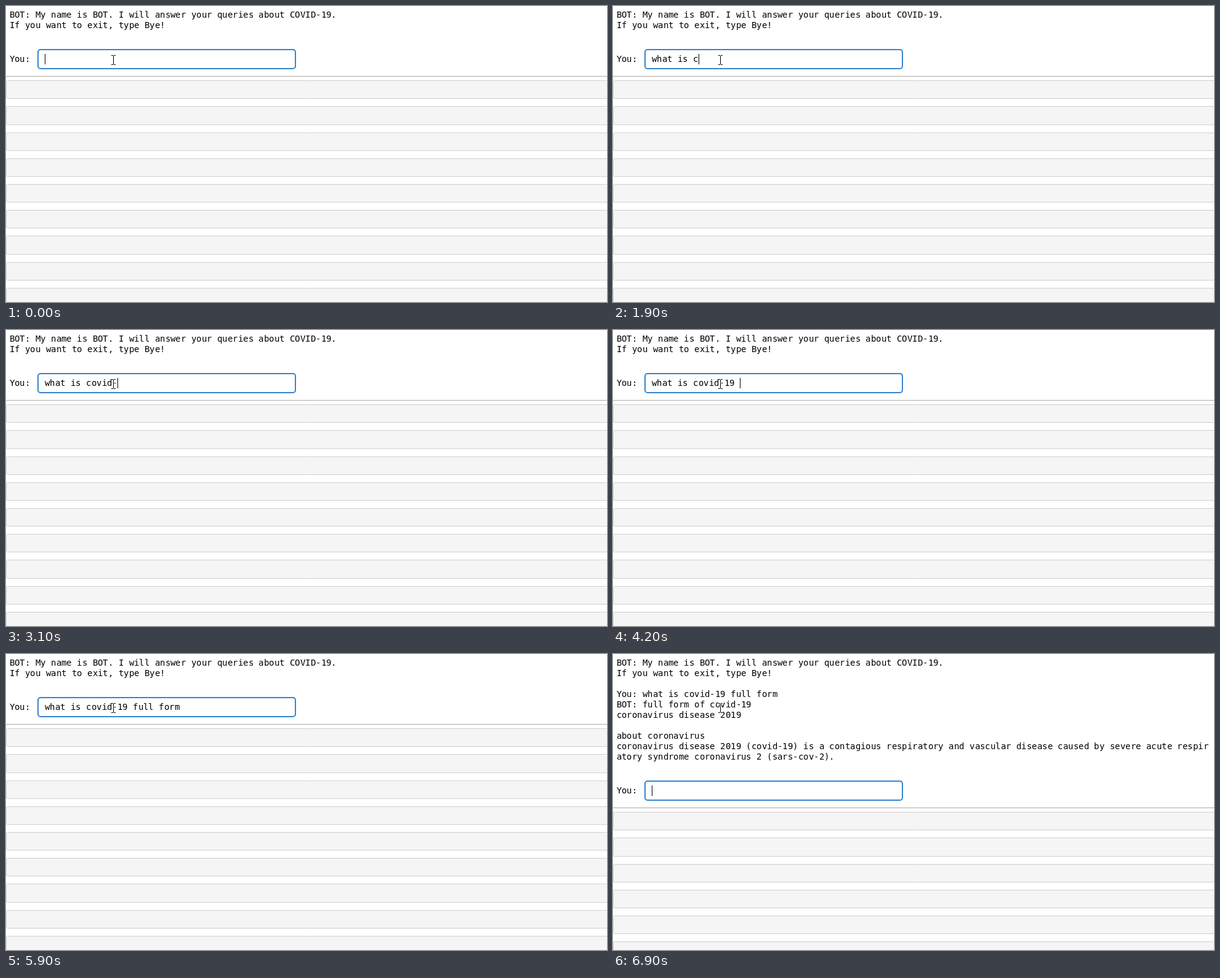
Animation of 976x482 px, one loop 8000 ms. Source, as an HTML page with a canvas:

```html
<!DOCTYPE html>
<html lang="en">
<head>
<meta charset="utf-8">
<title>Chat bot</title>
<style>
html, body { margin: 0; width: 976px; height: 482px; overflow: hidden; background: #fff; }
canvas { display: block; }
</style>
</head>
<body>
<canvas id="stage" width="976" height="482"></canvas>
<script>
const ctx = document.getElementById('stage').getContext('2d');
const LOOP = 8000, SENT = 6800, ANSWERED = 6900;
const LINE = 17, ADVANCE = 506 / 60, MARGIN = 5.6, FIELD = 62.8;
const QUERY = 'what is covid-19 full form';
const INTRO = [
  'BOT: My name is BOT. I will answer your queries about COVID-19.',
  'If you want to exit, type Bye!'
];
const ANSWER = [
  'BOT: full form of covid-19',
  'coronavirus disease 2019',
  '',
  'about coronavirus',
  'coronavirus disease 2019 (covid-19) is a contagious respiratory and vascular disease caused by severe acute respir',
  'atory syndrome coronavirus 2 (sars-cov-2).'
];
// Typing pace: [ms, characters], steady in between
const PACE = [[0, 0], [300, 1], [1900, 9], [3100, 14], [3700, 15], [4900, 20], [5900, 26]];

function typedAt(t) {
  if (t >= ANSWERED) return 0;
  const next = PACE.findIndex(([time]) => time > t);
  if (next < 0) return QUERY.length;
  const [t0, n0] = PACE[next - 1], [t1, n1] = PACE[next];
  return Math.floor(n0 + (n1 - n0) * (t - t0) / (t1 - t0));
}

function rect(x, y, w, h, color) {
  ctx.fillStyle = color;
  ctx.fillRect(x, y, w, h);
}

// Monospaced glyphs sit on whole pixels
const column = (x, i) => Math.round(x + i * ADVANCE);

function text(str, x, y) {
  ctx.fillStyle = '#000';
  [...str].forEach((char, i) => ctx.fillText(char, column(x, i), y));
}

function roundBox(x, y, w, h, r, stroke, lineWidth, fill) {
  ctx.beginPath();
  ctx.roundRect(x, y, w, h, r);
  ctx.fillStyle = fill;
  ctx.fill();
  ctx.strokeStyle = stroke;
  ctx.lineWidth = lineWidth;
  ctx.stroke();
}

function drawInput(y, typed) {
  text('You:', MARGIN, y + 21);
  roundBox(52, y + 1, 418, 31, 4, '#3584d0', 2, '#fff');
  text(QUERY.slice(0, typed), FIELD, y + 21);
  if (typed < QUERY.length) rect(column(FIELD, typed), y + 8, 1, LINE, '#000');
}

function drawCells(ruleY, firstTop) {
  rect(0, ruleY, 976, 1, '#ababab');
  for (let top = firstTop; top < 482; top += 42.2) {
    const y = Math.round(top), bottom = Math.round(top + 29.2);
    roundBox(0.5, y + 0.5, 990, bottom - y, 2, '#cfcfcf', 1, '#f5f5f5');
  }
}

function drawPointer(x, y) {
  ctx.beginPath();
  ctx.moveTo(x, y - 7);
  ctx.lineTo(x, y + 7);
  for (const serifY of [y - 7.5, y + 7.5]) {
    for (const side of [-1, 1]) {
      ctx.moveTo(x + side * 0.5, serifY);
      ctx.lineTo(x + side * 3.5, serifY);
    }
  }
  for (const [color, width] of [['#fff', 3], ['#000', 1]]) {
    ctx.strokeStyle = color;
    ctx.lineWidth = width;
    ctx.stroke();
  }
}

function draw(t) {
  rect(0, 0, 976, 482, '#fff');
  ctx.font = '14px "DejaVu Sans Mono", monospace';
  const lines = [...INTRO];
  if (t >= SENT) lines.push('', 'You: ' + QUERY);
  if (t >= ANSWERED) lines.push(...ANSWER);
  lines.forEach((line, i) => text(line, MARGIN, 19 + i * LINE));

  if (t >= SENT && t < ANSWERED) {
    drawCells(86, 92.6);
  } else {
    const y = 36 + lines.length * LINE;
    drawInput(y, typedAt(t));
    drawCells(y + 44, y + 51.15);
  }
  drawPointer(174.5, 88);
}

const start = performance.now();
function tick() {
  draw((performance.now() - start) % LOOP);
  requestAnimationFrame(tick);
}
tick();
</script>
</body>
</html>
```
